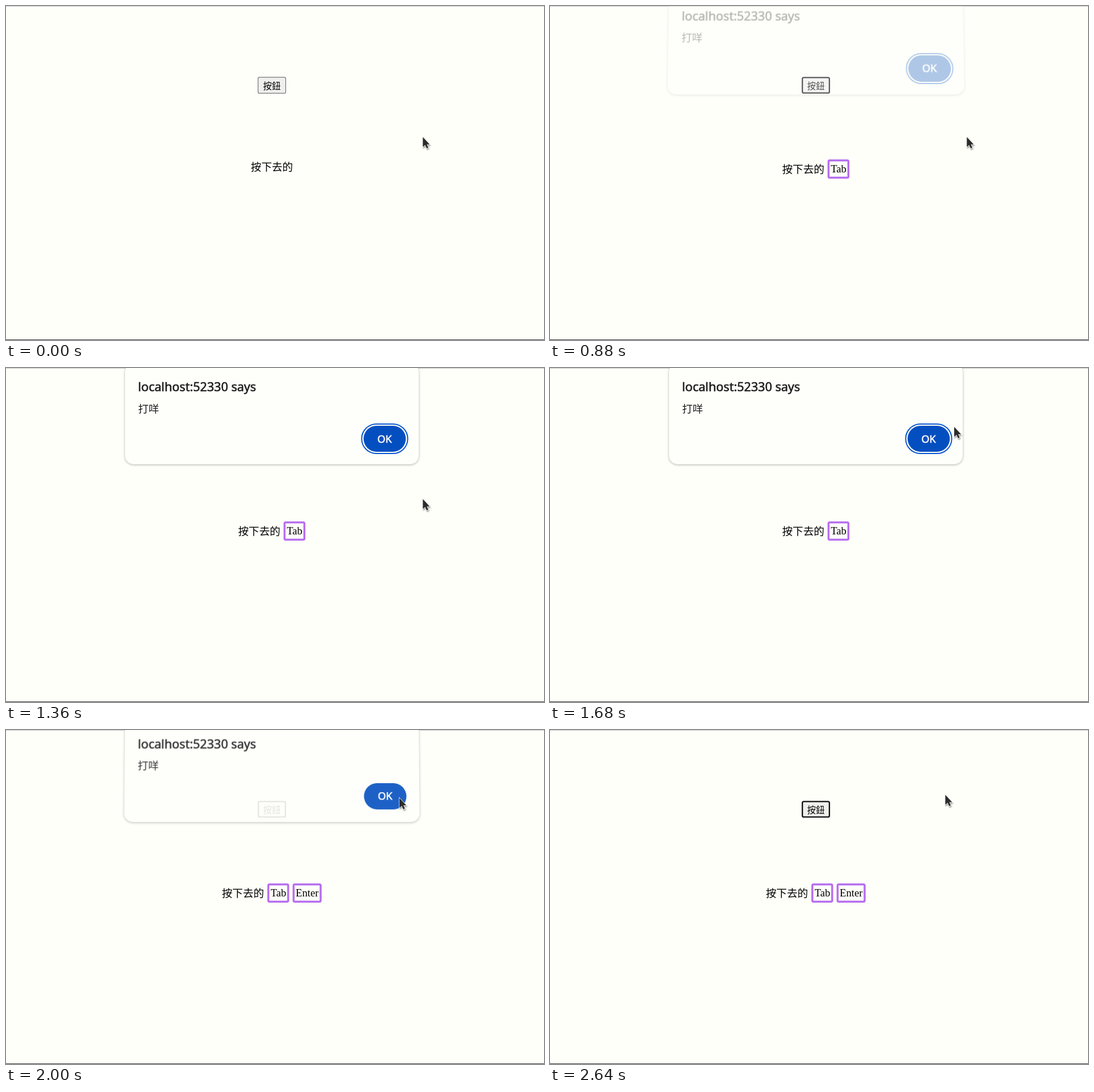
Write an HTML page that moves like this. It is 949 px wide and 590 px high and loops after 2720 ms.

```html
<!DOCTYPE html>
<html lang="zh-TW">
<head>
<meta charset="utf-8">
<title>按鈕</title>
<style>
html, body { margin: 0; width: 100%; height: 100%; overflow: hidden; background: #fefff9; }
svg { position: absolute; left: 0; top: 0; width: 949px; height: 590px; }
text { font: 18.6px "Noto Sans CJK TC", "Noto Sans CJK JP", "Noto Sans CJK", sans-serif; }
.key text { font-family: "Liberation Serif", serif; text-anchor: middle; }
.key rect { fill: none; stroke: #b76ef0; stroke-width: 3.5; }
#dialog { transform-origin: 469px 0; }
#panel { filter: drop-shadow(0 1.5px 2px rgba(0, 0, 0, .3)); }
#dialog .latin { font-family: "Noto Sans", "Open Sans", sans-serif; stroke-width: .6; }
#cursor { filter: drop-shadow(1px 2px 1.2px rgba(0, 0, 0, .4)); }
</style>
</head>
<body>
<svg viewBox="0 0 949 590">
  <path d="M0 .5H949" stroke="#c8c8c6"/>
  <path d="M0 589.5H949" stroke="#3c3c3c"/>
  <rect id="button" fill="#efefed"/>
  <text x="469" y="147" text-anchor="middle" style="font-size:15.5px">按鈕</text>
  <text id="label">按下去的</text>
  <g class="key" id="tab">
    <rect x="1.75" y="272.7" width="35" height="30.6" rx="2"/>
    <text x="19.5" y="293.5">Tab</text>
  </g>
  <g class="key" id="enter">
    <rect x="507.3" y="272.7" width="47.7" height="30.6" rx="2"/>
    <text x="531.2" y="293.5">Enter</text>
  </g>
</svg>
<svg id="dialog" viewBox="0 0 949 590">
  <rect id="panel" x="210" y="-8" width="518" height="178" rx="15" fill="#fefffa"/>
  <text class="latin" x="233" y="41" fill="#1f1f1f" stroke="#1f1f1f" style="font-size:21.6px">localhost:52330 says</text>
  <text x="233" y="78.5" fill="#1f1f1f">打咩</text>
  <rect id="ring" x="627.4" y="98.9" width="81.2" height="52.2" rx="26.1" fill="none" stroke="#0b57d0" stroke-width="2"/>
  <rect x="630.7" y="102" width="74.6" height="46" rx="23" fill="#044fc0"/>
  <text class="latin" x="667.7" y="131.5" fill="#fff" stroke="#fff" text-anchor="middle" style="font-size:18.3px">OK</text>
</svg>
<svg viewBox="0 0 949 590">
  <g id="cursor">
    <path d="M0 0V17.5L4 14L6.8 20L9.6 18.8L7 13H12Z" fill="#2b2b2b" stroke="#fff" stroke-width="1.4" paint-order="stroke"/>
  </g>
</svg>
<script>
const LOOP = 2720, STEP = 80;
const $ = id => document.getElementById(id);
const show = (id, on) => { $(id).style.display = on ? "" : "none"; };
const set = (id, attrs) => { for (const k in attrs) $(id).setAttribute(k, attrs[k]); };

// [time, values...]
const cursorPath = [
  [1360, 735.3, 231.5], [1440, 735, 226], [1520, 732, 202], [1600, 724, 148],
  [1680, 713, 104], [1760, 699, 114], [1840, 694, 120], [2480, 694, 120], [2640, 697.3, 114.5]
];
// lift, opacity
const dialogPath = [
  [880, .97, .32], [960, .5, .9], [1040, .08, 1], [1120, 0, 1],
  [1920, 0, 1], [2000, .53, .9], [2080, .97, .3]
];

function at(path, t) {
  const i = path.findIndex(p => p[0] > t);
  if (i < 0) return path[path.length - 1].slice(1);
  if (i === 0) return path[0].slice(1);
  const a = path[i - 1], b = path[i], f = (t - a[0]) / (b[0] - a[0]);
  return a.slice(1).map((v, k) => v + (b[k + 1] - v) * f);
}

function draw(t) {
  const tab = t >= 240, enter = t >= 1920;
  const w = tab ? 2.3 : 1.2;
  set("button", {
    x: 444 + w / 2, y: 125.3 + w / 2, width: 50 - w, height: 29.5 - w,
    rx: 2.5, stroke: tab ? "#101010" : "#767676", "stroke-width": w
  });
  set("label", { x: enter ? 380.7 : tab ? 409.5 : 431.8, y: tab ? 295.3 : 291.3 });
  set("tab", { transform: `translate(${enter ? 461 : 489.6} 0)` });
  show("tab", tab);
  show("enter", enter);

  // The dialog tilts towards the viewer while it lifts and fades
  const [lift, alpha] = at(dialogPath, t), tilt = (-6.8e-5 * lift).toFixed(8);
  show("dialog", t >= 880 && t < 2160);
  show("ring", t < 1840);
  $("dialog").style.opacity = alpha;
  $("dialog").style.transform =
    `translateY(${-16 * lift}px) matrix3d(1,0,0,0, 0,1,0,${tilt}, 0,0,1,0, 0,0,0,1)`;

  set("cursor", { transform: `translate(${at(cursorPath, t)})` });
}

const start = performance.now();
function tick() {
  const t = (performance.now() - start) % LOOP;
  draw(Math.floor(t / STEP) * STEP);
  requestAnimationFrame(tick);
}
tick();
</script>
</body>
</html>
```
